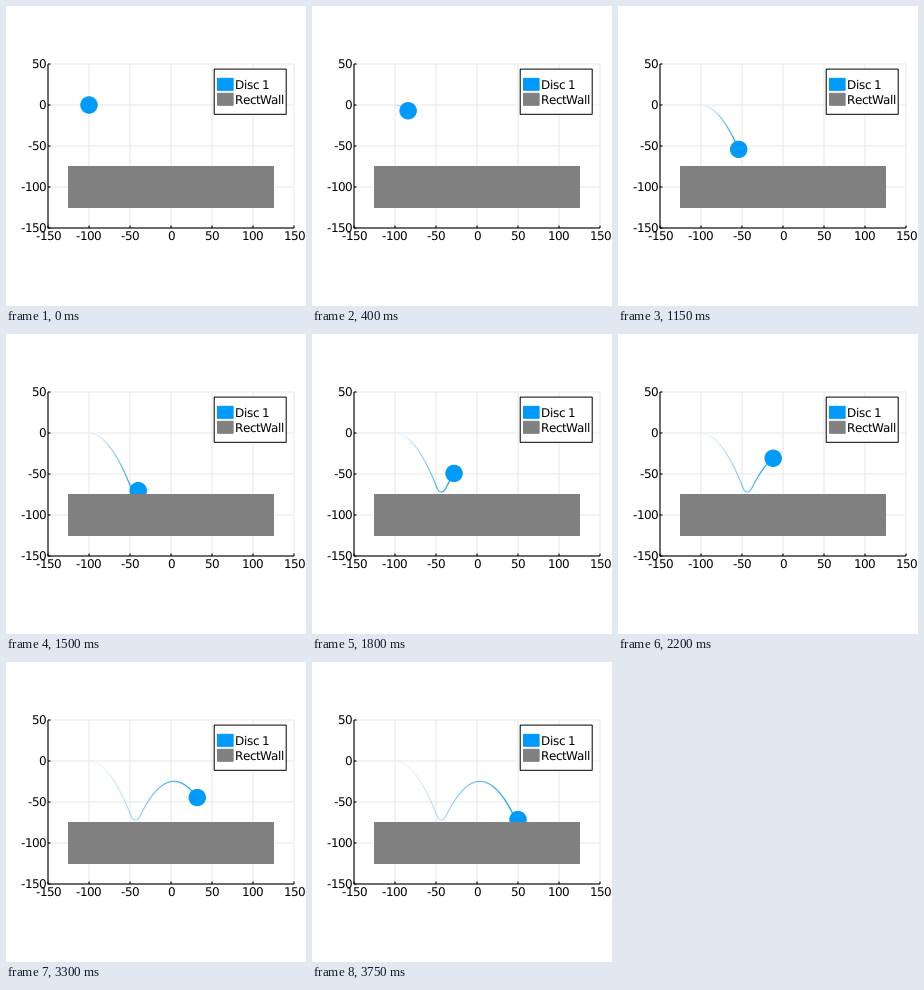
Recreate the animation shown at these times as a matplotlib script. Size 300x300 px, loop 3800 ms.

```python
import matplotlib.pyplot as plt
import numpy as np
from matplotlib.animation import FuncAnimation
from matplotlib.collections import LineCollection
from matplotlib.colors import to_rgb
from matplotlib.patches import Circle, PathPatch, Rectangle
from matplotlib.textpath import TextPath
from matplotlib.transforms import Affine2D

FRAMES, INTERVAL = 76, 50
BLUE, GRAY, GRID = "#009afa", "#808080", "#ebebeb"
PX = 0.72  # one pixel in points at 100 dpi
SCALE, X0, Y0 = 0.82, 165, 99
FONT, FONT_PX = {"family": "DejaVu Sans"}, 12


def to_px(x, y):
    return X0 + SCALE * x, Y0 - SCALE * y


def height(k):
    """Free fall, soft contact with the wall, second arc, second contact."""
    first_dip = [-68.9, -71.3, -72.0, -71.8, -70.3, -67.3]
    second_dip = [-68.7, -70.8, -71.3]
    if k < 26:
        return -0.0981 * k * (k + 1)
    if k < 32:
        return first_dip[k - 26]
    if k < 73:
        return -24.8 - 0.0981 * (k - 51.8) ** 2
    return second_dip[k - 73]


path = np.array([to_px(2 * k - 100, height(k)) for k in range(FRAMES)])

fig = plt.figure(figsize=(3, 3), dpi=100, facecolor="white")
ax = fig.add_axes([0, 0, 1, 1])
ax.set_xlim(0, 300)
ax.set_ylim(300, 0)
ax.axis("off")


def line(xs, ys, color="black", z=2):
    ax.plot(xs, ys, color=color, lw=1.1 * PX, zorder=z,
            solid_capstyle="butt", snap=False)


def box(x, y, w, h, face, edge, z):
    ax.add_patch(Rectangle((x, y), w, h, fc=face, ec=edge, lw=PX, zorder=z,
                           snap=False))


def glyph(text):
    return TextPath((0, 0), text, size=FONT_PX, prop=FONT)


def advance(char):
    """Pen step in whole pixels, rounded down."""
    step = glyph(char + "|").vertices[:, 0].max() - glyph("|").vertices[:, 0].max()
    return int(step)


def label(x, baseline, text, align):
    """Text as outlines on whole pixels; align is 0 left, 0.5 centre, 1 right."""
    steps = [advance(c) for c in text]
    x = round(x - align * sum(steps))
    for char, step in zip(text, steps):
        if char != " ":
            place = Affine2D().scale(1, -1).translate(x, round(baseline))
            ax.add_patch(PathPatch(glyph(char).transformed(place), fc="black",
                                   lw=0, zorder=9, snap=False))
        x += step


# Axes
left, top = to_px(-150, 50)
right, bottom = to_px(150, -150)
for v in range(-150, 151, 50):
    x = to_px(v, 0)[0]
    line([x, x], [top, bottom], GRID, 1)
    line([x, x], [bottom, bottom - 2.5])
    label(x, 234, str(v), 0.5)
for v in range(-150, 51, 50):
    y = to_px(0, v)[1]
    line([left, right], [y, y], GRID, 1)
    line([left, left + 2.5], [y, y])
    label(39.6, y + 4, str(v), 1)
line([left, left], [top, bottom + 0.5])
line([left, right], [bottom, bottom])

# Wall and legend
wall_x, wall_y = to_px(-125, -75)
box(wall_x, wall_y, 250 * SCALE, 50 * SCALE, GRAY, GRAY, 6)
box(208.2, 63.1, 72, 45.2, "white", "black", 7)
for y, color, name in [(78.3, BLUE, "Disc 1"), (93.3, GRAY, "RectWall")]:
    box(211.5, y - 6, 15.6, 12, color, color, 8)
    label(229, y + 4.5, name, 0)

# Moving parts
trail = LineCollection([], zorder=4)
ax.add_collection(trail, autolim=False)
disc = Circle(path[0], 10 * SCALE, fc=BLUE, ec=BLUE, lw=PX, zorder=5)
ax.add_patch(disc)


def update(k):
    disc.center = tuple(path[k])
    fade = np.arange(1, k + 1) / max(k, 1)
    trail.set_segments([path[i:i + 2] for i in range(k)])
    trail.set_color([(*to_rgb(BLUE), a) for a in fade])
    trail.set_linewidth((0.8 + 0.5 * fade) * PX if k else PX)
    return trail, disc


anim = FuncAnimation(fig, update, frames=FRAMES, interval=INTERVAL,
                     repeat=True, repeat_delay=0)
plt.show()
```
